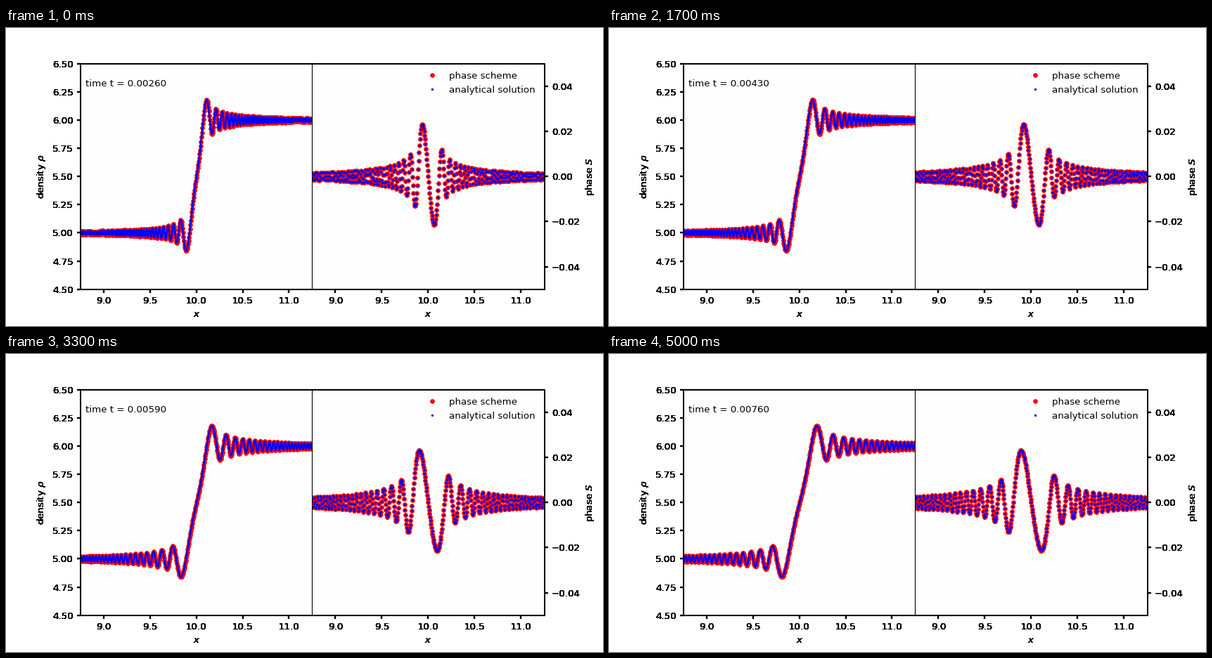
A matplotlib script that plays this animation: 849 px wide and 424 px high, repeating every 5.1 s.

```python
import numpy as np
import matplotlib.pyplot as plt
from matplotlib.animation import FuncAnimation

W, H, DPI = 849, 424, 96
FRAMES, INTERVAL = 51, 100
T0, DT = 0.0026, 0.0001

# Plot area in pixels, measured from the top left
LEFT, MID, RIGHT, TOP, BOTTOM = 106.1, 435.4, 765.5, 50.9, 371.6

RHO_LEFT, RHO_RIGHT, STEP_X = 5, 6, 10
x = STEP_X + 0.005 * np.arange(-252, 253)

plt.rcParams.update({
    "font.family": "DejaVu Sans",
    "font.size": 10,
    "axes.linewidth": 0.8,
    "axes.facecolor": "#fefefe",
    "xtick.major.width": 1.8,
    "ytick.major.width": 1.8,
    "xtick.major.pad": 4.3,
    "ytick.major.pad": 4.3,
})


def fresnel_table(w_max=15, n=30001):
    """Fresnel integral C + iS on a fine grid, by the trapezoid rule."""
    w = np.linspace(0, w_max, n)
    f = np.exp(0.5j * np.pi * w**2)
    total = np.cumsum((f[1:] + f[:-1]) / 2) * (w[1] - w[0])
    return w, np.concatenate([[0], total])


W_GRID, FRESNEL = fresnel_table()


def solve(t):
    """Density and phase of a spreading step in a free wave function."""
    w = (x - STEP_X) / np.sqrt(np.pi * t)
    cs = np.sign(w) * np.interp(np.abs(w), W_GRID, FRESNEL)
    a, b = np.sqrt(RHO_LEFT), np.sqrt(RHO_RIGHT)
    psi = (a + b) / 2 + (b - a) / 2 * (1 - 1j) * cs
    return np.abs(psi)**2, np.angle(psi)


def overprint(artists, times=10):
    """Draw artists repeatedly, so that their soft edges turn solid."""
    for artist in artists:
        def draw(renderer, once=artist.draw):
            for _ in range(times):
                once(renderer)
        artist.draw = draw


def add_panel(x0, x1, **style):
    rect = [x0 / W, 1 - BOTTOM / H, (x1 - x0) / W, (BOTTOM - TOP) / H]
    return fig.add_axes(rect, **style)


def set_scale(ax, ylim, yticks, ylabel, labelpad):
    ax.set_xlim(8.75, 11.25)
    ax.set_ylim(*ylim)
    ax.set_xticks(np.arange(9, 11.1, 0.5))
    ax.set_yticks(yticks)
    ax.set_xlabel("$x$", labelpad=4.8)
    ax.set_ylabel(ylabel, labelpad=labelpad)
    overprint(ax.get_xticklabels() + ax.get_yticklabels())
    overprint([ax.xaxis.label, ax.yaxis.label])


fig = plt.figure(figsize=(W / DPI, H / DPI), dpi=DPI, facecolor="white")

density_ax = add_panel(LEFT, MID)
set_scale(density_ax, (4.5, 6.5), np.arange(4.5, 6.6, 0.25), r"density $\rho$", 5)

phase_ax = add_panel(MID, RIGHT)
phase_ax.yaxis.tick_right()
phase_ax.yaxis.set_label_position("right")
set_scale(phase_ax, (-0.05, 0.05), 0.02 * np.arange(-2, 3), "phase $S$", 3.6)

# Heavier outline around both panels
frame = add_panel(LEFT, RIGHT, facecolor="none", xticks=[], yticks=[])
for spine in frame.spines.values():
    spine.set_linewidth(1.5)

dots = dict(marker=".", ls="none")
rho_dots, = density_ax.plot([], [], color="red", ms=8, **dots)
rho_line, = density_ax.plot([], [], color="blue", lw=1.9)
s_dots, = phase_ax.plot([], [], color="red", ms=8, label="phase scheme", **dots)
s_points, = phase_ax.plot([], [], color="blue", ms=3, label="analytical solution", **dots)
phase_ax.legend(loc="upper right", bbox_to_anchor=(0.997, 1.003), frameon=False)
clock = density_ax.text(0.02, 0.9, "", transform=density_ax.transAxes)


def update(i):
    t = T0 + DT * i
    rho, s = solve(t)
    for line in (rho_dots, rho_line):
        line.set_data(x, rho)
    for line in (s_dots, s_points):
        line.set_data(x, s)
    clock.set_text(f"time t = {t:.5f}")
    return rho_dots, rho_line, s_dots, s_points, clock


anim = FuncAnimation(fig, update, frames=FRAMES, interval=INTERVAL,
                     repeat=True, repeat_delay=0)
plt.show()
```
